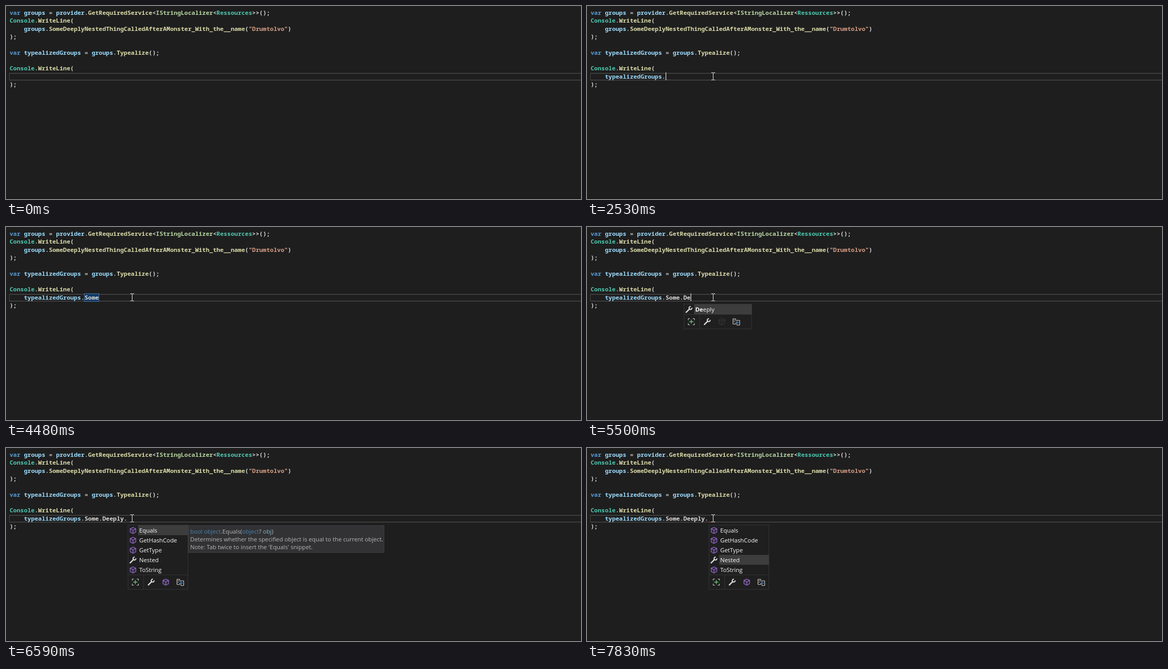
An HTML page that plays this animation: 1105 px wide and 372 px high, repeating every 8000 ms.

```html
<!DOCTYPE html>
<html lang="en">
<head>
<meta charset="utf-8">
<title>Code completion</title>
<style>
  html, body { margin: 0; width: 100%; height: 100%; overflow: hidden; background: #1e1e1e; }
  svg { display: block; }
  text { white-space: pre; fill: #dcdcdc; }
  .code { font: 600 11.43px "Noto Sans Mono", "DejaVu Sans Mono", monospace; font-variant-ligatures: none; }
  .ui { font: 11.3px "Open Sans", "Noto Sans", sans-serif; }
  #popup text { fill: #fafafa; }
  .b { font-weight: 700; }
  .k { fill: #569cd6; }
  .v { fill: #9cdcfe; }
  .m { fill: #dcdcaa; }
  .t { fill: #4ec9b0; }
  .i { fill: #b8d7a3; }
  .s { fill: #d69d85; }
  .o { fill: #b4b4b4; }
  .line { fill: none; stroke: #d8d8d8; }
  .cube { fill: var(--face, #8a63b82e); stroke: var(--edge, #9068c4); stroke-width: 1.2; stroke-linejoin: round; }
  .off { --face: none; --edge: #363636; }
</style>
</head>
<body>
<svg width="1105" height="372" viewBox="0 0 1105 372">
  <defs>
    <g id="wrench" class="line">
      <path d="M-5.4 5.4L1.2-1.2" stroke-width="2.4" stroke-linecap="round"/>
      <path d="M3.4-5.6A2.8 2.8 0 1 0 5.6-3.4" stroke-width="2"/>
    </g>
    <path id="cube" class="cube" d="M0-6L5.5-3.4V3.2L0 6L-5.5 3.2V-3.4ZM-5.5-3.4L0-.7L5.5-3.4M0-.7V6"/>
    <g id="expand" class="line">
      <path d="M-6-3V-6H-3M3-6H6V-3M6 3V6H3M-3 6H-6V3"/>
      <path d="M-4 0H4M0-4V4" stroke="#6ccb6c" stroke-width="1.3"/>
    </g>
    <g id="extend" class="line">
      <path d="M-1-1V-5.5H-6.5V4.5H-1V2M1-1V-2.5H6.5V6.5H1V4M-5-3H-3M-5 0H-3"/>
      <path d="M5 1.8H0M2-.2L0 1.8L2 3.8" stroke="#55aaff"/>
    </g>
  </defs>

  <path fill="#464646" d="M6 129H1105V130.5H7V142H1105V143.5H6Z"/>
  <rect y="370" width="1105" height="2" fill="#191919"/>
  <g id="mark"></g>

  <g class="code">
    <text x="7" y="17"><tspan class="k">var</tspan> <tspan class="v">groups</tspan> <tspan class="o">=</tspan> <tspan class="v">provider</tspan><tspan class="o">.</tspan><tspan class="m">GetRequiredService</tspan>&lt;<tspan class="i">IStringLocalizer</tspan>&lt;<tspan class="t">Ressources</tspan>&gt;&gt;();</text>
    <text x="7" y="32"><tspan class="t">Console</tspan><tspan class="o">.</tspan><tspan class="m">WriteLine</tspan>(</text>
    <text x="7" y="48">    <tspan class="v">groups</tspan><tspan class="o">.</tspan><tspan class="m">SomeDeeplyNestedThingCalledAfterAMonster_With_the__name</tspan>(<tspan class="s">"Drumtolvo"</tspan>)</text>
    <text x="7" y="63">);</text>
    <text x="7" y="94"><tspan class="k">var</tspan> <tspan class="v">typealizedGroups</tspan> <tspan class="o">=</tspan> <tspan class="v">groups</tspan><tspan class="o">.</tspan><tspan class="m">Typealize</tspan>();</text>
    <text x="7" y="124"><tspan class="t">Console</tspan><tspan class="o">.</tspan><tspan class="m">WriteLine</tspan>(</text>
    <text x="7" y="140" id="typed"></text>
    <text x="7" y="155">);</text>
  </g>

  <g id="hint"></g>
  <g id="popup" class="ui"></g>
  <g id="tip" class="ui"></g>
  <rect id="caret" y="128" width="1.2" height="15" fill="#dcdcdc"/>
  <path id="mouse" fill="#f0f0f0" d="M-3-7H0V-6H1V-7H4V-6H1V7H4V8H1V7H0V8H-3V7H0V-6H-3Z"/>
</svg>

<script>
const LOOP = 8000, TOP = 149, ROW = 19, CELL = 6.858;
const column = n => 7 + n * CELL;
const span = (cls, text) => `<tspan class="${cls}">${text}</tspan>`;
const icon = (name, x, y, cls = "") =>
  `<g class="${cls}" transform="translate(${x} ${y})"><use href="#${name}"/></g>`;

// Completion list: the rows, then a strip of filter buttons.
function popup(x, w, items, selected, match = 0) {
  const foot = TOP + ROW * items.length;
  const methods = /^(Equals|Get|ToString)/;
  const rows = items.map((name, i) => {
    const y = TOP + ROW * i;
    const bar = i === selected
      ? `<rect x="${x + 20}" y="${y}" width="${w - 20}" height="${ROW}" fill="#3d3d3d"/>` : "";
    const bold = i === selected ? match : 0;
    return bar + icon(methods.test(name) ? "cube" : "wrench", x + 10, y + 10) +
      `<text x="${x + 22}" y="${y + 14}">${span("b", name.slice(0, bold))}${name.slice(bold)}</text>`;
  });
  const cubes = items.some(name => methods.test(name));
  return `<rect x="${x + .5}" y="${TOP - .5}" width="${w - 1}" height="${foot - TOP + 29}" fill="#1f1f20" stroke="#333337"/>` +
    rows.join("") +
    `<path stroke="#333337" d="M${x} ${foot + .5}h${w}M${x + 30.5} ${foot}v29"/>` +
    icon("expand", x + 14.5, foot + 14.5) + icon("wrench", x + 45, foot + 14.5) +
    icon("cube", x + 73, foot + 14.5, cubes ? "" : "off") + icon("extend", x + 101, foot + 14.5);
}

function tip(x, w, h, lines, opacity) {
  return `<g opacity="${opacity}"><rect x="${x + .5}" y="149.5" width="${w - 1}" height="${h}" fill="#38383a" stroke="#47474a"/>` +
    lines.map((s, i) => `<text x="${x + 4}" y="${165 + 15 * i}">${s}</text>`).join("") + "</g>";
}

const typeName = path => span("t", "TypealizedRessources") + path.map(p => "." + span("t", p)).join("");
const property = (type, owner, name) =>
  [`${typeName(type)} ${typeName(owner)}.${name} { ${span("k", "get")}; }`];
const someTip = o => tip(268, 371, 22, property(["SomeGroup"], [], "Some"), o);
const deeplyTip = o => tip(318, 511, 22,
  property(["SomeGroup", "DeeplyGroup"], ["SomeGroup"], "Deeply"), o);
const equalsTip = o => tip(350, 377, 52, [
  `${span("k", "bool")} ${span("k", "object")}.Equals(${span("k", "object")}? ${span("v", "obj")})`,
  "Determines whether the specified object is equal to the current object.",
  "Note: Tab twice to insert the 'Equals' snippet."
], o);

const rootItems = ["Equals", "GetHashCode", "GetType", "Greetings", "Labels", "Messages", "Questions", "Some", "ToString"];
const someItems = ["Deeply", "Equals", "GetHashCode", "GetType", "ToString"];
const deepItems = ["Equals", "GetHashCode", "GetType", "Nested", "ToString"];
const deepPopup = selected => popup(234, 116, deepItems, selected);

const indent = "    ";
const line = tail => indent + span("v", "typealizedGroups") + span("o", ".") + tail.replace(/\./g, span("o", "."));
const dots = n => `<path stroke="#707070" stroke-width="1.2" stroke-dasharray="1.2 1.8" d="M${column(n) + 1} 142h7"/>`;
const squiggle = `<path fill="none" stroke="#d13438" d="M233.5 143.5l2-2l2 2l2-2"/>`;
const highlight = `<rect x="150.5" y="128.5" width="28" height="15" fill="#123a66" stroke="#4a6f96"/>`;

// Each track lists [start time, content].
const tracks = {
  typed: [[0, ""], [1540, indent + "typealizedGroups."], [1910, line("")], [2850, line("S")],
    [3020, line("So")], [3630, line("Some")], [4880, line("Some.")], [5190, line("Some.D")],
    [5260, line("Some.De")], [5960, line("Some.Deeply")], [6040, line("Some.Deeply.")]],
  mark: [[0, ""], [4480, highlight], [5030, ""]],
  hint: [[0, ""], [1910, dots(21)], [2850, dots(22)], [3020, dots(23)], [3330, ""],
    [3710, dots(25)], [4030, ""], [7600, squiggle]],
  popup: [[0, ""], [2780, popup(152, 113, rootItems, 0)], [2850, popup(152, 113, rootItems, 7, 1)],
    [3100, popup(152, 116, ["Some"], 0, 2)], [3630, ""],
    [5030, popup(186, 131, someItems, 0)], [5190, popup(186, 131, someItems, 0, 1)],
    [5260, popup(186, 131, someItems, 0, 2)], [5500, popup(186, 131, ["Deeply"], 0, 2)], [5960, ""],
    [6110, deepPopup(0)], [7520, deepPopup(1)], [7600, deepPopup(2)], [7830, deepPopup(3)]],
  tip: [[0, ""], [3480, someTip(.4)], [3550, someTip(.8)], [3630, ""],
    [5880, deeplyTip(.8)], [5960, ""],
    [6420, equalsTip(.25)], [6510, equalsTip(.55)], [6590, equalsTip(.8)], [6660, equalsTip(.9)],
    [6760, equalsTip(1)], [7440, ""]]
};

// Caret column, or -1 while it is blinked off.
const caretTrack = [[0, -1], [830, 4], [1370, -1], [1610, 21], [2070, -1], [2530, 21], [2850, 22],
  [3020, 23], [3480, -1], [3710, 25], [4180, -1], [4650, 25], [4880, 26], [5190, 27], [5260, 28],
  [5880, -1], [6110, 33], [6590, -1], [7080, 33], [7520, -1]];

function at(track, t) {
  let value = track[0][1];
  for (const [start, v] of track) if (t >= start) value = v;
  return value;
}

function mouseAt(t) {
  if (t < 70) return [-50, -50];
  if (t < 740) {
    const k = Math.min(7, Math.floor((t - 70) / 74)) / 7;
    const left = (1 - k) ** 2;
    return [Math.round(244 + 673 * left), Math.round(135 + 230 * left)];
  }
  return at([[740, [247, 138]], [830, [246, 130]], [910, [242, 135]]], t);
}

const $ = id => document.getElementById(id);
const shown = {};

function draw() {
  const t = performance.now() % LOOP;
  for (const id in tracks) {
    const html = at(tracks[id], t);
    if (shown[id] !== html) $(id).innerHTML = shown[id] = html;
  }
  const caret = at(caretTrack, t);
  $("caret").setAttribute("x", caret < 0 ? -10 : Math.round(column(caret)));
  $("mouse").setAttribute("transform", `translate(${mouseAt(t)})`);
  requestAnimationFrame(draw);
}
draw();
</script>
</body>
</html>
```
